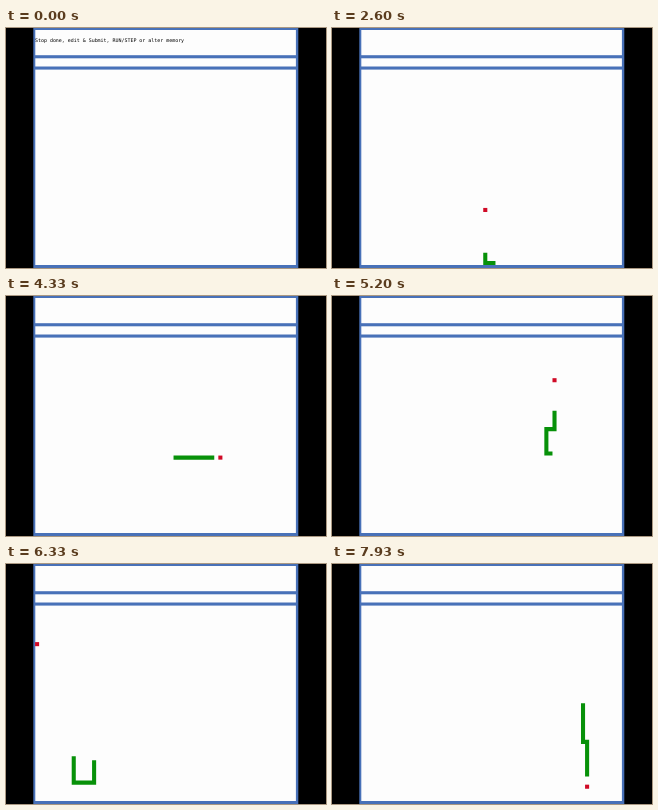
These frames come from a looping animation (320 by 240 pixels, 8 s). An HTML page with a canvas:

```html
<!DOCTYPE html>
<html lang="en">
<head>
<meta charset="utf-8">
<title>Snake</title>
<style>
  html, body { margin: 0; width: 100%; height: 100%; overflow: hidden; background: #000; }
  canvas { display: block; width: 320px; height: 240px; filter: blur(0.4px); }
</style>
</head>
<body>
<canvas id="stage" width="320" height="240"></canvas>
<script>
const ctx = document.getElementById('stage').getContext('2d');
const LOOP = 8000, FPS = 15, LAST_TICK = LOOP * FPS / 1000 - 1;
const START = 3, START_LENGTH = 3;
const SPEED = 6.258, LAG = 16.4; // cells per tick, cells
const CELL = 4.073, LEFT = 29.05, TOP = 41.45;

const route = [[34, 24]];
const meals = [];

// The snake always moves sideways first, then up or down.
function go(x, y) {
  let [cx, cy] = route[route.length - 1];
  while (cx !== x) route.push([cx += Math.sign(x - cx), cy]);
  while (cy !== y) route.push([cx, cy += Math.sign(y - cy)]);
}

function eat(x, y) {
  go(x, y);
  meals.push({ cell: [x, y], index: route.length - 1 });
}

go(3, 44);
go(51, 29);
eat(52, 6);
go(52, 4);
eat(62, 47);
eat(30, 34);
eat(3, 20);
eat(42, 31);
eat(13, 29);
eat(20, 29);
eat(45, 29);
eat(47, 9);
eat(42, 4);
eat(49, 28);
go(45, 22);
eat(47, 10);
eat(3, 20);
eat(14, 43);
go(9, 9);
eat(0, 9);
go(0, 0);
eat(57, 0);
go(58, 3);
go(54, 33);
eat(55, 44);

const centre = ([x, y]) => [LEFT + (x + 0.5) * CELL, TOP + (y + 0.5) * CELL];

function drawPanels() {
  ctx.fillStyle = '#000';
  ctx.fillRect(0, 0, 320, 240);
  ctx.fillStyle = '#4871b8';
  ctx.fillRect(27.3, 0, 265, 240);
  ctx.fillStyle = '#fdfdfd';
  for (const [top, bottom] of [[2, 27.2], [30.3, 38.5], [41.6, 237]]) {
    ctx.fillRect(29.3, top, 260.6, bottom - top);
  }
}

function drawMessage() {
  ctx.fillStyle = '#000';
  ctx.font = '4.96px "DejaVu Sans Mono", monospace';
  ctx.fillText('Stop done, edit & Submit, RUN/STEP or alter memory', 29, 13.6);
}

function drawGame(tick) {
  const head = Math.floor(tick * SPEED - LAG);
  const eaten = meals.filter(meal => meal.index <= head).length;
  const tail = Math.max(0, head - START_LENGTH - eaten + 1);

  const [x, y] = centre(meals[eaten].cell);
  ctx.fillStyle = '#d00a26';
  ctx.fillRect(x - CELL / 2, y - CELL / 2, CELL, CELL);

  ctx.strokeStyle = '#079109';
  ctx.lineWidth = CELL;
  ctx.lineCap = 'square';
  ctx.beginPath();
  for (const cell of route.slice(tail, head + 1)) ctx.lineTo(...centre(cell));
  ctx.stroke();
}

const origin = performance.now();

function loop() {
  const time = (performance.now() - origin) % LOOP;
  const tick = Math.min(Math.round(time * FPS / 1000), LAST_TICK);
  drawPanels();
  if (tick < START) drawMessage();
  else drawGame(tick);
  requestAnimationFrame(loop);
}
loop();
</script>
</body>
</html>
```
